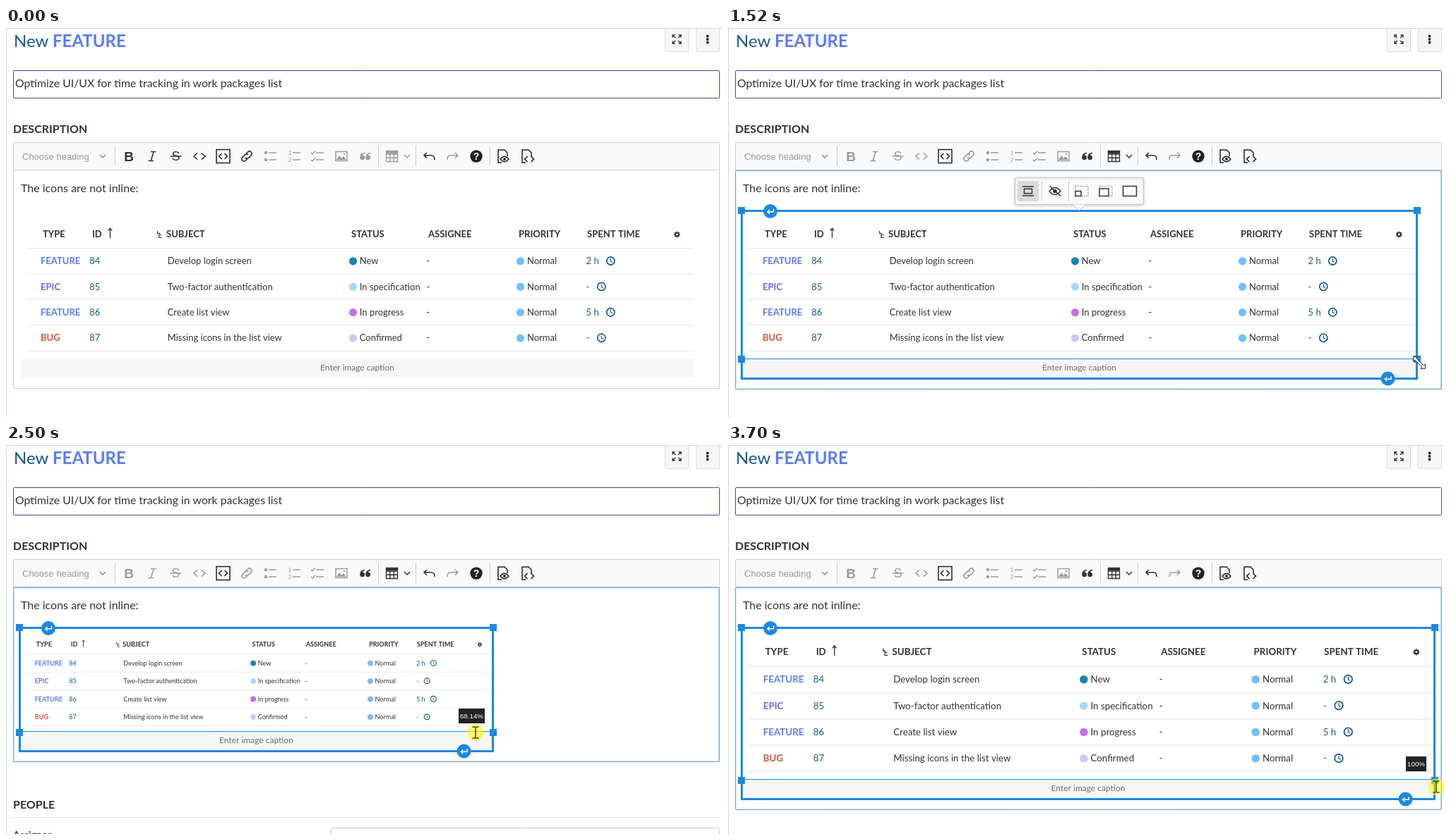
Animation, 1014 px wide and 552 px high, one loop 3.76 s. Source, as an HTML page with a canvas:

```html
<!DOCTYPE html>
<html lang="en">
<head>
<meta charset="utf-8">
<title>Resizing an image in the editor</title>
<style>
  html, body { margin: 0; width: 100%; height: 100%; overflow: hidden; background: #fff; }
  canvas { display: block; }
</style>
</head>
<body>
<canvas id="stage" width="1014" height="552"></canvas>
<script>
const ctx = document.getElementById('stage').getContext('2d');
const LOOP = 3760, SELECT = 750, DRAG = 1670;
const DARK = '#333', PALE = '#9b9b9b', BLUE = '#1c88e5', NAVY = '#175a8e', HOVER = '#ffc83d';
const LATO = 'Lato, sans-serif', ARIAL = '"Liberation Sans", Arial, sans-serif';
const FULL = 0.9743;

// Screen updates: [first, last, count]
const runs = [[0, 0, 1], [120, 440, 5], [600, 600, 1], [750, 1210, 7], [1440, 1520, 2],
  [1670, 2130, 7], [2210, 2500, 5], [2580, 2700, 2], [2750, 3230, 7], [3310, 3380, 2], [3460, 3700, 4]];

const sizeKeys = [[1670, FULL], [1800, 0.89], [1900, 0.9272], [1990, 0.95], [2500, 0.6814],
  [2670, 0.64], [2990, 0.7232], [3380, 0.9182], [3600, 1]];
const pointerKeys = [[120, 944, 541], [440, 921, 448], [750, 921, 448], [980, 966, 476], [1210, 978, 474],
  [1440, 979, 475], [1670, 978, 474], [1780, 900, 449], [1900, 950, 453], [1980, 957, 457], [2500, 665, 408],
  [2650, 645, 402], [2990, 739, 418], [3380, 951, 461], [3540, 1002, 482], [3700, 1003, 485]];

const rows = [
  ['FEATURE', '#5a7bfa', '84', 'Develop login screen', 'New', '#1982b6', '2 h'],
  ['EPIC', '#7d62f2', '85', 'Two-factor authentication', 'In specification', '#a6d9f8', '-'],
  ['FEATURE', '#5a7bfa', '86', 'Create list view', 'In progress', '#c46ee8', '5 h'],
  ['BUG', '#d6573c', '87', 'Missing icons in the list view', 'Confirmed', '#d6c2f4', '-']
];

function snap(t) {
  const [first, last, count] = runs.filter(r => r[0] <= t).pop();
  if (count === 1) return first;
  const step = (last - first) / (count - 1);
  return first + step * Math.min(count - 1, Math.floor((t - first) / step + 0.001));
}

// Monotone cubic through the keys
function track(keys, t, col = 1) {
  const n = keys.length - 1;
  if (t <= keys[0][0]) return keys[0][col];
  if (t >= keys[n][0]) return keys[n][col];
  const i = keys.findIndex(k => k[0] > t) - 1;
  const slope = j => (keys[j + 1][col] - keys[j][col]) / (keys[j + 1][0] - keys[j][0]);
  const tangent = j => {
    if (j === 0 || j === n) return 0;
    const a = slope(j - 1), b = slope(j);
    return a * b <= 0 ? 0 : 2 * a * b / (a + b);
  };
  const h = keys[i + 1][0] - keys[i][0], u = (t - keys[i][0]) / h, v = 1 - u;
  return keys[i][col] * (1 + 2 * u) * v * v + keys[i + 1][col] * u * u * (3 - 2 * u) +
    h * (tangent(i) * u * v * v - tangent(i + 1) * u * u * v);
}

function text(str, x, y, size, color = DARK, weight = 400, align = 'left', family = LATO) {
  ctx.font = `${weight} ${size}px ${family}`;
  ctx.fillStyle = color;
  ctx.textAlign = align;
  ctx.fillText(str, x, y + size * 0.36);
}

function rect(x, y, w, h, fill, stroke, radius = 0, line = 1) {
  ctx.beginPath();
  ctx.roundRect(x, y, w, h, radius);
  if (fill) { ctx.fillStyle = fill; ctx.fill(); }
  if (stroke) { ctx.strokeStyle = stroke; ctx.lineWidth = line; ctx.stroke(); }
}

function disc(x, y, r, fill) {
  ctx.beginPath();
  ctx.arc(x, y, r, 0, 7);
  ctx.fillStyle = fill;
  ctx.fill();
}

function icon(x, y, d, color = DARK, width = 1.5, fill) {
  const shape = new Path2D(d);
  ctx.save();
  ctx.translate(x, y);
  if (fill) { ctx.fillStyle = fill; ctx.fill(shape); }
  if (width) { ctx.strokeStyle = color; ctx.lineWidth = width; ctx.stroke(shape); }
  ctx.restore();
}

const hline = (x1, x2, y, color) => icon(0, y, `M${x1} 0H${x2}`, color, 1);
const chevron = (x, color) => icon(x, 182, 'M-4 -2L0 2L4 -2', color, 1.5);

function header() {
  hline(0, 1014, 0.5, '#d2d2d2');
  icon(0.5, 0, 'M0 0V552', '#d2d2d2', 1);
  text('New', 11, 18.4, 24, NAVY);
  text('FEATURE', 66, 18.4, 24, '#5a7bfa', 700);
  for (const x of [933.5, 977.5]) rect(x, 0.5, 33, 33, '#f6f6f6', '#dcdcdc', 1);
  icon(950, 16, 'M2 -2L6 -6M2.5 -6H6V-2.5M-2 -2L-6 -6M-2.5 -6H-6V-2.5M2 2L6 6M2.5 6H6V2.5M-2 2L-6 6M-2.5 6H-6V2.5', DARK, 1.4);
  for (const y of [11.5, 16, 20.5]) disc(993.5, y, 1.9, '#222');
  rect(10.5, 60.5, 1000, 39, '#fff', '#4644a8', 1);
  text('Optimize UI/UX for time tracking in work packages list', 13, 78.3, 15.8);
  text('DESCRIPTION', 10, 143.3, 16, DARK, 700);
}

function toolbar(selected) {
  const inline = selected ? PALE : DARK, block = selected ? DARK : PALE, y = 182;
  rect(10.5, 162.5, 1000, 39, '#fafafa', '#cccccc', 1);
  text('Choose heading', 23, y, 13, '#999', 400, 'left', ARIAL);
  chevron(137, '#888');
  for (const x of [154.5, 527.5, 580.5, 685.5]) icon(x, 167, 'M0 0V29', '#cccccc', 1);

  text('B', 174, y, 19, inline, 700, 'center', ARIAL);
  icon(207, y, 'M-2 -6.5H5.5M-5.5 6.5H2M2.2 -6.5L-1.8 6.5', inline, 1.6);
  text('S', 240.5, y, 18, inline, 400, 'center', ARIAL);
  icon(240.5, y, 'M-8 0H8', inline, 1.5);
  icon(274, y, 'M-3 -4.5L-8 0L-3 4.5M3 -4.5L8 0L3 4.5', inline, 1.6);
  icon(307.5, y, 'M-9.5 -9.5H9.5V9.5H-9.5ZM-2 -4L-6 0L-2 4M2 -4L6 0L2 4', '#222', 1.5);
  icon(341, y, 'M-1.5 -3l3-3a3.2 3.2 0 0 1 4.6 4.6l-3.5 3.5a3.2 3.2 0 0 1-4.6 0' +
    'M1.5 3l-3 3a3.2 3.2 0 0 1-4.6-4.6l3.5-3.5a3.2 3.2 0 0 1 4.6 0', inline, 1.6);

  for (const x of [374, 408, 441]) icon(x, y, 'M-2 -5H9M-2 5H9', PALE, 1.5);
  for (const dy of [-5, 5]) {
    disc(368, y + dy, 2.2, PALE);
    text(dy < 0 ? '1' : '2', 402, y + dy, 8.5, PALE, 400, 'center', ARIAL);
    icon(435, y + dy, 'M-3 0L-1 2L3 -2.5', PALE, 1.4);
  }
  icon(475, y, 'M-8 -6.5H8V6.5H-8Z', PALE, 1.5);
  icon(475, y, 'M-7 5L-3 -1L0 3L3 0L7 5ZM3 -4h2v2h-2z', PALE, 0, PALE);
  for (const x of [505, 513]) {
    icon(x, y, 'M3 -5C-1 -5 -3.5 -2 -3.5 2A3.2 3.2 0 1 0 0 -1.3C0 -3 1 -4 3 -4Z', block, 0.5, block);
  }
  icon(546.5, y, 'M-8 -7.5H8V7.5H-8ZM-8 -3H8M-8 2.3H8M-2.7 -7V7.5M2.7 -7V7.5', block, 1.4);
  icon(546.5, y, 'M-8 -7.5H8V-4H-8Z', block, 0, block);
  chevron(568, block);
  const bend = 'M-3.5 -5L-7.5 -1.2L-3.5 2.6M-7 -1.2H3C6 -1.2 7.5 1 7.5 5';
  icon(599.5, y, bend, DARK, 1.6);
  ctx.save();
  ctx.translate(1265, 0);
  ctx.scale(-1, 1);
  icon(632.5, y, bend, PALE, 1.5);
  ctx.restore();
  disc(666, y, 8.7, '#222');
  text('?', 666, y, 14, '#fff', 700, 'center', ARIAL);
  for (const x of [704, 738]) icon(x, y, 'M-2 9H-7V-9H2L6 -5V0', '#222', 1.5);
  icon(706, 186, 'M-6 0Q0 -7.5 6 0Q0 7.5 -6 0Z', '#222', 1.3, '#fff');
  disc(706, 186, 1.9, '#222');
  icon(740.5, 186, 'M-2 -4L-6 0L-2 4M3 -4L7 0L3 4', '#1a1a55', 1.6);
}

function clock(x, y) {
  ctx.beginPath();
  ctx.arc(x, y, 5.6, 0, 7);
  ctx.strokeStyle = NAVY;
  ctx.lineWidth = 1.7;
  ctx.stroke();
  icon(x, y, 'M0 -3.5V0.4L2.6 1.6', NAVY, 1.2);
}

function gear(x, y) {
  for (let i = 0; i < 4; i++) {
    const a = i * Math.PI / 4, c = 4.4 * Math.cos(a), s = 4.4 * Math.sin(a);
    icon(x, y, `M${-c} ${-s}L${c} ${s}`, DARK, 1.7);
  }
  disc(x, y, 3.3, DARK);
  disc(x, y, 1.4, '#fff');
}

function table(scale) {
  ctx.save();
  ctx.translate(21.3, 260.3);
  ctx.scale(scale, scale);
  ctx.translate(-21.3, -260.3);
  const heads = { TYPE: 52, ID: 122, SUBJECT: 227, STATUS: 489, ASSIGNEE: 598, PRIORITY: 726, 'SPENT TIME': 823 };
  for (const name in heads) text(name, heads[name], 292, 13, DARK, 700);
  icon(147.5, 291, 'M0 7V-6.5M-2.7 -3.5L0 -6.8L2.7 -3.5', DARK, 1.3);
  icon(217, 292.5, 'M-2.5 -4.5V-1H0.5M0 -2V5H4M0 1H3.5', DARK, 1.2);
  gear(950.3, 293);
  hline(29, 974, 312.7, '#e4e4e4');
  rows.forEach(([type, tint, id, subject, status, color, spent], i) => {
    const y = 330.5 + i * 36.4;
    text(type, 49, y, 13, tint, 700);
    text(id, 118.3, y, 13, NAVY);
    text(subject, 228.7, y, 13);
    disc(491.5, y + 0.3, 5.6, color);
    text(status, 500.8, y, 13);
    text('-', 595.5, y, 13);
    disc(728.5, y + 0.3, 5.6, '#72bffb');
    text('Normal', 738, y, 13);
    text(spent, 821.6, y, 13, NAVY);
    clock(spent === '-' ? 843.3 : 856.3, y);
    hline(29, 974, y + 18.5, '#e4e4e4');
  });
  ctx.restore();
}

function returnButton(x, y, color) {
  disc(x, y, 10, color);
  icon(x, y, 'M4.5 -3.5V0.8H-4M-1.2 -2L-4.2 0.8L-1.2 3.6', '#fff', 1.4);
}

function outline(edge, foot, color) {
  const right = Math.round(edge) - 0.5, base = Math.round(foot + 26.3) + 0.5;
  rect(19.5, 259.5, right - 19.5, base - 259.5, null, color, 0, 3);
  returnButton(60, 260, color);
  returnButton(edge - 41.5, base, color);
}

function handles(edge, foot) {
  hline(21, edge - 2, Math.floor(foot - 1) + 0.5, BLUE);
  for (const x of [19, Math.round(edge)]) {
    for (const y of [259, Math.round(foot)]) rect(x - 5, y - 5, 10, 10, BLUE);
  }
}

function balloon() {
  ctx.save();
  ctx.shadowColor = 'rgba(0,0,0,.2)';
  ctx.shadowBlur = 4;
  ctx.shadowOffsetY = 1;
  rect(406.5, 212.5, 182, 38, '#fbfbfb', '#c4c4c4', 2);
  ctx.restore();
  icon(497, 251, 'M-9 -0.5L0 8L9 -0.5', '#c4c4c4', 1, '#fbfbfb');
  rect(410, 217, 30, 29, '#dadada', null, 2);
  for (const x of [444.5, 482.5]) icon(x, 217, 'M0 0V29', '#cccccc', 1);
  icon(425, 231.5, 'M-8 -6.5H8M-8 6.5H8M-5.5 -3.2H5.5V3.2H-5.5Z', DARK, 1.5);
  icon(463, 231.5, 'M-8 0Q0 -10 8 0Q0 10 -8 0ZM-7 -7L8 7', DARK, 1.5);
  disc(463, 231.5, 2.8, DARK);
  ctx.setLineDash([1.5, 1.8]);
  for (const x of [501, 535]) icon(x, 231.5, 'M-9 -7H9V7H-9Z', '#777', 1.2);
  ctx.setLineDash([]);
  icon(501, 231.5, 'M-9 0H-1V7H-9Z', DARK, 1.5, '#fff');
  icon(535, 231.5, 'M-9 -3.5H4V7H-9Z', DARK, 1.5, '#fff');
  icon(569, 231.5, 'M-9.5 -7H9.5V7H-9.5Z', DARK, 1.5);
}

function sizeLabel(size, edge, foot) {
  const label = (size > 0.9999 ? '100' : (size * 100).toFixed(2)) + '%';
  ctx.font = `9.7px ${ARIAL}`;
  const w = Math.round(ctx.measureText(label).width + 4.4);
  const right = Math.floor(edge - 12), top = Math.round(foot - 34);
  rect(right - w, top, w, 21, '#222');
  text(label, right - w / 2, top + 10.5, 9.7, '#fff', 400, 'center', ARIAL);
}

function pointer(x, y, kind, pressed) {
  if (pressed) disc(x, y, 11.7, 'rgba(255,252,0,.58)');
  if (kind === 'resize') {
    icon(x, y, 'M-8.5 -8.5H-2L-4 -6.3L6.3 4L8.5 2V8.5H2L4 6.3L-6.3 -4L-8.5 -2Z',
      pressed ? '#8a6d1a' : '#222', 1, pressed ? '#f6e552' : '#fff');
  } else if (kind === 'text') {
    icon(x, y, 'M-4.5 -8H-1.5L0 -7L1.5 -8H4.5M0 -7V7M-4.5 8H-1.5L0 7L1.5 8H4.5', pressed ? '#453f12' : '#111', 1.5);
  } else {
    icon(x, y, 'M0 0V15.5L3.6 12.2L6 17.6L8.3 16.6L6 11.3H11Z', '#111', 1, '#fff');
  }
}

function editor(bottom, selected) {
  rect(10.5, 201.5, 1000, bottom - 201.5, '#fff', '#cccccc', 1);
  toolbar(selected);
  if (selected) {
    hline(12, 1010, 203.5, '#efefef');
    rect(10.8, 202.2, 999.2, bottom - 202.4, null, '#4a98dc', 1);
  }
  text('The icons are not inline:', 21, 227.3, 16);
}

function people(bottom) {
  text('PEOPLE', 10, bottom + 60.5, 16, DARK, 700);
  hline(10, 1011, bottom + 79, '#dddddd');
  text('Assignee', 10, bottom + 103, 14, DARK, 700);
  rect(460.5, bottom + 94, 550, 36, '#fff', '#cccccc', 2);
}

function draw(t) {
  const selected = t >= SELECT, dragging = t >= DRAG;
  const size = track(sizeKeys, t), edge = 976.4 * size + 24.7;
  const foot = 261.5 + 0.2183 * (edge - 19), bottom = Math.round(foot + 41.3) + (selected ? 0.5 : -0.5);
  const px = track(pointerKeys, t), py = track(pointerKeys, t, 2);

  ctx.fillStyle = '#fefefe';
  ctx.fillRect(0, 0, 1014, 552);
  header();
  editor(bottom, selected);
  people(bottom);

  rect(21, Math.round(foot - 1), Math.round(edge) - 23, 27, '#f6f6f6');
  table(size / FULL);
  text('Enter image caption', (edge + 19) / 2, foot + 11, 12, '#6b6b6b', 400, 'center');

  if (selected) {
    outline(edge, foot, BLUE);
    handles(edge, foot);
    if (dragging) sizeLabel(size, edge, foot);
    else balloon();
  } else if (t >= 120 && py < foot + 28) {
    outline(edge, foot, HOVER);
  }

  if (t >= 120) {
    const onHandle = selected && Math.hypot(px - edge, py - foot) < 9;
    const overTable = !dragging && py < foot - 1;
    const kind = onHandle ? 'resize' : selected && !overTable ? 'text' : 'arrow';
    pointer(px, py, kind, dragging || (t >= 600 && !selected));
  }
}

const start = performance.now();
function tick() {
  draw(snap((performance.now() - start) % LOOP));
  requestAnimationFrame(tick);
}
tick();
</script>
</body>
</html>
```
